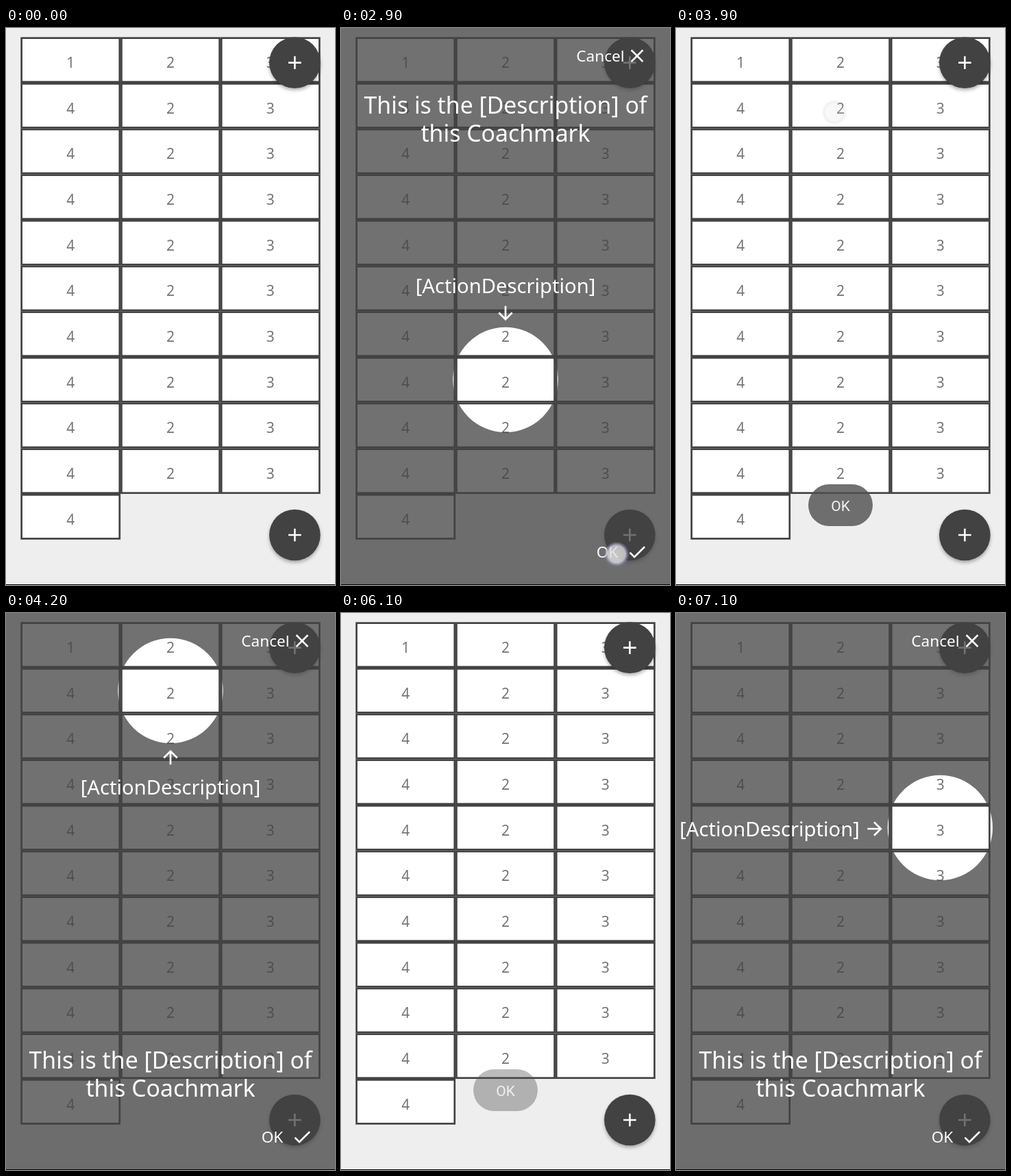
These frames come from a looping animation (480 by 813 pixels, 8000 ms). An HTML page:

```html
<!DOCTYPE html>
<html lang="en">
<head>
<meta charset="utf-8">
<title>Coachmark tour</title>
<style>
  html, body { margin: 0; width: 100%; height: 100%; overflow: hidden; background: #eee; }
  svg { display: block; width: 100%; height: 100%; }
  text { font-family: "Noto Sans", "Open Sans", sans-serif; text-anchor: middle; }
  .cell rect { fill: #fff; stroke: #424242; stroke-width: 2.67; }
  .cell text { fill: #757575; font-size: 21px; }
  .fab circle { fill: #424242; filter: drop-shadow(0 3px 2.5px rgba(0, 0, 0, .3)); }
  .icon { fill: none; stroke: #fff; stroke-width: 2; }
  .mark text { fill: #fff; }
  .shade { fill: #424242; fill-opacity: .75; fill-rule: evenodd; }
  .description { font-size: 33.8px; }
  .action { font-size: 29.2px; }
  .button { font-size: 22.6px; }
  #toast rect { fill: #505050; fill-opacity: .81; }
  #toast text { fill: #f4f4f4; font: 21px Roboto, sans-serif; }
</style>
</head>
<body>
<svg viewBox="0 0 480 813">
  <defs>
    <radialGradient id="glow">
      <stop offset="0" stop-color="#e4e4e4" stop-opacity=".82"/>
      <stop offset=".68" stop-color="#dcdcde" stop-opacity=".8"/>
      <stop offset=".78" stop-color="#a9a9c4" stop-opacity=".75"/>
      <stop offset="1" stop-color="#8888b0" stop-opacity="0"/>
    </radialGradient>
  </defs>
  <rect width="480" height="813" fill="#eee"/>
  <g id="page"></g>
  <g id="marks"></g>
  <g id="toast">
    <rect x="193" y="666" width="94" height="61" rx="30.5"/>
    <text x="240" y="705">OK</text>
  </g>
  <circle id="touch" r="18.5" fill="url(#glow)"/>
  <rect y="812" width="480" height="1"/>
</svg>
<script>
const $ = id => document.getElementById(id);
const LEFT = 21.33, TOP = 13.33, CELL_W = 145.78, CELL_H = 66.67, BORDER = 2.67;

const ICONS = {
  plus: 'M5 12H19M12 5V19',
  close: 'M5.7 5.7L18.3 18.3M18.3 5.7L5.7 18.3',
  check: 'M4.1 12.7L9 17.6L20.3 6.3',
  arrow: 'M12 4V18.6M4.7 11.3L12 18.6L19.3 11.3'
};

const icon = (name, x, y, angle = 0) =>
  `<path class="icon" d="${ICONS[name]}" transform="translate(${x} ${y}) rotate(${angle}) scale(1.333) translate(-12 -12)"/>`;
const label = (kind, text, x, y) => `<text class="${kind}" x="${x}" y="${y}">${text}</text>`;

function cell(index) {
  const col = index % 3, row = Math.floor(index / 3);
  const x = LEFT + col * CELL_W, y = TOP + row * CELL_H;
  const digit = index ? [4, 2, 3][col] : 1;
  return `<g class="cell"><rect x="${x + BORDER / 2}" y="${y + BORDER / 2}" width="${CELL_W - BORDER}" height="${CELL_H - BORDER}"/>
    ${label('digit', digit, x + CELL_W / 2, y + 44.6)}</g>`;
}

const fab = y => `<g class="fab"><circle cx="421.33" cy="${y}" r="37.33"/>${icon('plus', 421.33, y)}</g>`;

function mark({ hole: [x, y], textY, action, arrow }) {
  const r = 76.7;
  return `<g class="mark">
    <path class="shade" d="M0 0H480V813H0ZM${x - r} ${y}a${r} ${r} 0 1 0 ${2 * r} 0a${r} ${r} 0 1 0 ${-2 * r} 0Z"/>
    ${label('description', 'This is the [Description] of', 240, textY)}
    ${label('description', 'this Coachmark', 240, textY + 41)}
    ${label('action', '[ActionDescription]', ...action)}
    ${icon('arrow', ...arrow)}
    ${label('button', 'Cancel', 378.5, 49)}${icon('close', 432, 40.7)}
    ${label('button', 'OK', 388.5, 773)}${icon('check', 432, 764.7)}
  </g>`;
}

const MARKS = [
  { hole: [240, 513.4], textY: 125, action: [240, 386.5], arrow: [240, 416.5], open: 430, close: 3150 },
  { hole: [240, 113.4], textY: 665, action: [240, 264.5], arrow: [240, 210.5, 180], open: 3930, close: 5950 },
  { hole: [385.4, 313.4], textY: 665, action: [136.5, 325.5], arrow: [290, 315, -90], open: 6830, close: Infinity }
];
const TOUCHES = [
  { x: 402, y: 768, from: 2900, release: 3100 },
  { x: 231, y: 123, from: 3800, release: 3770 },
  { x: 385.5, y: 779, from: 5900, release: 5900 },
  { x: 389.5, y: 334, from: 6700, release: 6670 }
];
const TOASTS = [
  { from: 3150, to: 3930 },
  { from: 5950, to: 6830 }
];

$('page').innerHTML = Array.from({ length: 31 }, (_, i) => cell(i)).join('') + fab(50.67) + fab(740);
$('marks').innerHTML = MARKS.map(mark).join('');
const markNodes = [...$('marks').children];

const ramp = (t, start, length) => Math.min(1, Math.max(0, (t - start) / length));
const easeOut = p => 1 - (1 - p) ** 2;

function show(node, opacity) {
  node.style.display = opacity > 0 ? '' : 'none';
  node.style.opacity = opacity;
}

function draw(now) {
  const t = Math.floor(now % 8000 / 100) * 100;

  MARKS.forEach(({ open, close }, i) =>
    show(markNodes[i], ramp(t, open, 250) * (1 - ramp(t, close, 150))));

  show($('toast'), Math.max(...TOASTS.map(({ from, to }) =>
    easeOut(ramp(t, from, 550)) * (1 - ramp(t, to, 250)))));

  const touch = TOUCHES.find(({ from, release }) => t >= from && t < release + 170);
  show($('touch'), touch ? 1 - ramp(t, touch.release, 170) : 0);
  if (touch) $('touch').setAttribute('transform', `translate(${touch.x} ${touch.y})`);

  requestAnimationFrame(draw);
}
requestAnimationFrame(draw);
</script>
</body>
</html>
```
